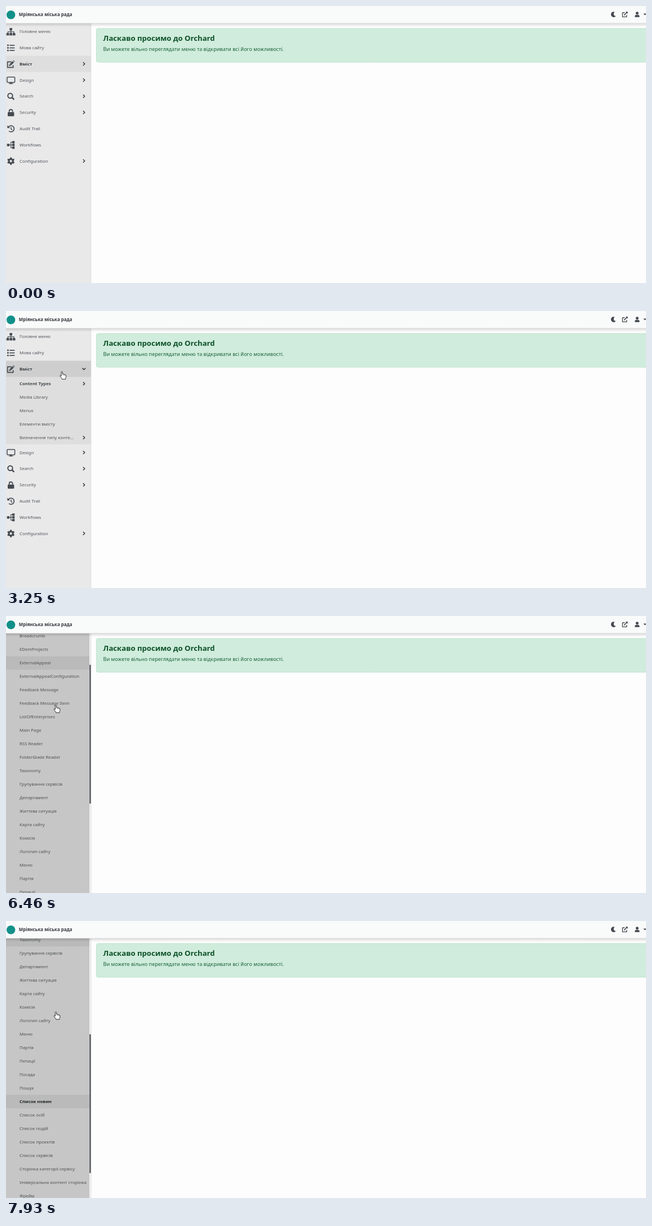
Write an HTML page with a canvas that moves like this. It is 1136x493 px and loops after 8000 ms.

```html
<!DOCTYPE html>
<html lang="uk">
<head>
<meta charset="utf-8">
<title>Адмін-панель</title>
<style>
html, body { margin: 0; width: 100%; height: 100%; overflow: hidden; background: #fdfdfd; }
canvas { display: block; width: 1136px; height: 493px; }
</style>
</head>
<body>
<canvas id="stage" width="1136" height="493"></canvas>
<script>
const ctx = document.getElementById('stage').getContext('2d');
const W = 1136, H = 493, LOOP = 8000;
const TOP = 31, VIEW = 521, SIDE = 151, ROW = 28.8, SUB = 24;
const FONT = '"Noto Sans", "Open Sans", sans-serif';
const INK = '#444a50', LABEL = '#505458';

const TYPES = ['Breadcrumb', 'EDemProjects', 'ExternalAppeal', 'ExternalAppealConfiguration',
  'Feedback Message', 'Feedback Message Item', 'ListOfEnterprises', 'Main Page', 'RSS Reader',
  'FolderGlade Reader', 'Taxonomy', 'Групування сервісів', 'Департамент', 'Життєва ситуація',
  'Карта сайту', 'Комісія', 'Логотип сайту', 'Меню', 'Партія', 'Петиції', 'Посада', 'Пошук',
  'Список новин', 'Список осіб', 'Список подій', 'Список проектів', 'Список сервісів',
  'Сторінка категорії сервісу', 'Універсальна контент сторінка', 'Фрейм'];
const SUBMENU = ['Media Library', 'Menus', 'Елементи вмісту', 'Визначення типу конте...'];

// Motion: each key is [time, value...]; values ease between neighbouring keys.
const CURSOR = [[610, 1087, 486], [1410, 113, 95], [1710, 100.7, 103], [3040, 100.7, 103],
  [3790, 93, 128.7], [5420, 93, 128.7], [5680, 91.3, 152], [5740, 90.5, 153], [5980, 88.7, 157],
  [6120, 88.7, 157], [6400, 88.5, 158.6], [6600, 88.5, 159], [6910, 88.5, 161.7]];
const SCROLL = [[6150, 0], [6300, 60], [6330, 60], [6478, 120], [6700, 120], [6900, 180],
  [6930, 180], [7180, 240], [7450, 240], [7644, 300], [7720, 300], [7930, 360]];
const HOVER = [[1350, 'Вміст'], [3430, 'Content Types'], [5560, 'Breadcrumb'],
  [6220, 'ExternalAppeal'], [6580, 'Feedback Message Item'], [6900, 'RSS Reader'], [7180, 'Taxonomy']];
const CLICKS = [[2200, 2350], [4890, 5020]];
const OPEN_TIME = 350;

const clamp = x => Math.max(0, Math.min(1, x));
const smooth = x => x * x * (3 - 2 * x);

function sample(keys, t) {
  if (t <= keys[0][0]) return keys[0].slice(1);
  for (let i = 1; i < keys.length; i++) {
    const a = keys[i - 1], b = keys[i];
    if (t < b[0]) {
      const p = smooth((t - a[0]) / (b[0] - a[0]));
      return a.slice(1).map((v, k) => v + (b[k + 1] - v) * p);
    }
  }
  return keys[keys.length - 1].slice(1);
}

// The CSS "ease" curve.
function ease(x) {
  const bez = (u, a, b) => 3 * u * (1 - u) ** 2 * a + 3 * u * u * (1 - u) * b + u ** 3;
  let lo = 0, hi = 1;
  for (let i = 0; i < 16; i++) {
    const mid = (lo + hi) / 2;
    if (bez(mid, .25, .25) < x) lo = mid; else hi = mid;
  }
  return x <= 0 ? 0 : x >= 1 ? 1 : bez(lo, .1, 1);
}
const opened = (t, start) => ease(clamp((t - start) / OPEN_TIME));

function box(x, y, w, h, color) {
  ctx.fillStyle = color;
  ctx.fillRect(x, y, w, h);
}
function text(str, x, y, size, color, weight = 400) {
  ctx.font = `${weight} ${size}px ${FONT}`;
  ctx.fillStyle = color;
  ctx.fillText(str, x, y);
}
function line(width, ...pts) {
  ctx.lineWidth = width;
  ctx.beginPath();
  for (let i = 0; i < pts.length; i += 2) ctx.lineTo(pts[i], pts[i + 1]);
  ctx.stroke();
}
function arc(x, y, r, from = 0, to = 7, width = 0) {
  ctx.beginPath();
  ctx.arc(x, y, r, from, Math.min(to, from + 2 * Math.PI));
  if (width) { ctx.lineWidth = width; ctx.stroke(); } else ctx.fill();
}
function round(x, y, w, h, r) {
  ctx.beginPath();
  ctx.roundRect(x, y, w, h, r);
}
function at(x, y, draw) {
  ctx.save();
  ctx.translate(x, y);
  ctx.fillStyle = ctx.strokeStyle = INK;
  ctx.lineJoin = 'round';
  draw();
  ctx.restore();
}
function clipped(x, y, w, h, draw) {
  ctx.save();
  ctx.beginPath();
  ctx.rect(x, y, w, h);
  ctx.clip();
  draw();
  ctx.restore();
}

const icons = {
  sitemap() {
    ctx.fillRect(-2.3, -6.5, 4.6, 4.3);
    for (const x of [-7.8, -2.3, 3.2]) ctx.fillRect(x, 2.4, 4.6, 4.3);
    line(1.2, 0, -3, 0, 3);
    line(1.2, -5.5, 3, -5.5, .2, 5.5, .2, 5.5, 3);
  },
  list() {
    for (const y of [-4.6, 0, 4.6]) {
      ctx.fillRect(-6.6, y - 1.3, 2.7, 2.6);
      ctx.fillRect(-2.4, y - .8, 9, 1.7);
    }
  },
  edit() {
    line(1.7, 1, -4, -6, -4, -6, 6, 4, 6, 4, 2);
    line(3.4, -1, 1.2, 4.1, -3.9);
    line(3.4, 4.9, -4.7, 5.7, -5.5);
    ctx.beginPath();
    ctx.moveTo(-3.4, 3.6); ctx.lineTo(-2.8, .2); ctx.lineTo(0, 3); ctx.fill();
  },
  desktop() {
    round(-6.7, -5.6, 13.6, 9.4, 1);
    ctx.lineWidth = 1.5; ctx.stroke();
    ctx.fillRect(-1.6, 4, 3.4, 2);
    ctx.fillRect(-3.6, 5.5, 7.4, 1.2);
  },
  search() {
    arc(-1.2, -1.2, 4.2, 0, 7, 2);
    line(2.6, 2, 2, 5.6, 5.6);
  },
  lock() {
    round(-5.7, -.8, 11.4, 7.4, 1.3); ctx.fill();
    arc(0, -2.4, 3, Math.PI, 2 * Math.PI, 1.9);
    line(1.9, -3, -2.4, -3, 0); line(1.9, 3, -2.4, 3, 0);
  },
  history() {
    arc(.2, 0, 5.5, -2.5, 2.3, 1.7);
    ctx.beginPath();
    ctx.moveTo(-6.4, -6); ctx.lineTo(-6.4, -1.2); ctx.lineTo(-1.6, -1.2); ctx.fill();
    line(1.5, .3, -3, .3, .5, 2.4, 2.1);
  },
  flow() {
    ctx.fillRect(-7, -2.1, 4.4, 4.4);
    for (const y of [-7, -2.1, 2.8]) ctx.fillRect(2.4, y, 4.2, 4.2);
    line(1.2, -3, 0, 3, 0);
    line(1.2, 3, -5, 0, -5, 0, 5, 3, 5);
  },
  cog() {
    arc(0, 0, 3.6, 0, 7, 3);
    for (let i = 0; i < 6; i++) {
      const a = Math.PI / 6 + i * Math.PI / 3, c = Math.cos(a), s = Math.sin(a);
      line(3, 4 * c, 4 * s, 6.6 * c, 6.6 * s);
    }
  },
};

const MENU = [['Головне меню', 'sitemap'], ['Мова сайту', 'list'], ['Вміст', 'edit', 1],
  ['Design', 'desktop', 1], ['Search', 'search', 1], ['Security', 'lock', 1],
  ['Audit Trail', 'history'], ['Workflows', 'flow'], ['Configuration', 'cog', 1]];

function chevron(y, down) {
  at(138.3, y, () => {
    if (down) ctx.rotate(Math.PI / 2);
    ctx.strokeStyle = '#33383c';
    line(1.4, -1.5, -2.9, 1.5, 0, -1.5, 2.9);
  });
}
function label(str, middle, strong, color = LABEL) {
  text(str, 24, middle + 2.7, 7.8, color, strong ? 600 : 400);
}

function drawTypes(y, width, hover) {
  box(0, y, width, TYPES.length * SUB, '#c6c6c6');
  TYPES.forEach((name, i) => {
    const top = y + i * SUB, active = name === 'Список новин';
    if (active || name === hover) box(0, top, width, SUB, '#bababa');
    label(name, top + SUB / 2, active, active ? '#1f2326' : '#4d5053');
  });
}

function drawSubmenu(y, width, hover, typesHeight, typesOpen) {
  if (hover === 'Content Types') box(0, y, width, SUB, '#cecece');
  label('Content Types', y + SUB / 2, true, '#42474b');
  chevron(y + SUB / 2, typesOpen);
  y += SUB;
  if (typesHeight > 0) clipped(0, y, width, typesHeight, () => drawTypes(y, width, hover));
  const rest = y + typesHeight;
  SUBMENU.forEach((name, i) => {
    const mid = rest + (i + .5) * SUB;
    label(name, mid);
    if (i === 3) chevron(mid, false);
  });
}

function drawSidebar(t, hover) {
  const typesHeight = TYPES.length * SUB * opened(t, 5020);
  const subHeight = (5 * SUB + typesHeight) * opened(t, 2350);
  const total = MENU.length * ROW + subHeight;
  const overflow = total > VIEW;
  const width = overflow ? 148 : SIDE;
  const scroll = sample(SCROLL, t)[0];

  box(0, TOP, SIDE, H - TOP, '#e9e9ea');
  clipped(0, TOP, width, H - TOP, () => {
    let y = TOP - scroll;
    for (const [name, icon, hasChildren] of MENU) {
      const mid = y + ROW / 2, content = name === 'Вміст';
      if (content) box(0, y, width, ROW + subHeight, '#dedede');
      if (name === hover) box(0, y, width, ROW, '#cecece');
      at(8.7, mid + .3, icons[icon]);
      label(name, mid, content, content ? '#393e42' : LABEL);
      if (hasChildren) chevron(mid, content && t >= 2350);
      y += ROW;
      if (content && subHeight > 0) {
        const top = y;
        clipped(0, top, width, subHeight, () => drawSubmenu(top, width, hover, typesHeight, t >= 5020));
        y += subHeight;
      }
    }
  });
  if (overflow) {
    box(148, TOP, 3, H - TOP, '#f0f0f1');
    box(148.3, TOP + scroll * VIEW / total, 2.5, VIEW * VIEW / total, '#45494e');
  }
  box(SIDE - .4, TOP, .8, H - TOP, '#dedede');
}

function drawMain() {
  box(0, 0, W, H, '#fdfdfd');
  round(160.4, 39.9, 1000, 60.2, 3);
  ctx.fillStyle = '#d0ecdc'; ctx.fill();
  ctx.strokeStyle = '#afdfc5'; ctx.lineWidth = .7; ctx.stroke();
  text('Ласкаво просимо до Orchard', 172.6, 61.6, 13.15, '#0c5128', 600);
  text('Ви можете вільно переглядати меню та відкривати всі його можливості.', 172.6, 79.8, 9.03, '#17613a');
}

function drawHeader() {
  const shade = ctx.createLinearGradient(0, TOP - 1, 0, TOP + 6);
  shade.addColorStop(0, 'rgba(0,0,0,.16)');
  shade.addColorStop(1, 'rgba(0,0,0,0)');
  box(0, TOP - 1, W, 7, shade);
  box(0, 0, W, TOP - .6, '#f9fafa');
  ctx.fillStyle = '#12908a';
  arc(8.7, 15.7, 7.7);
  text('Мріянська міська рада', 22.8, 18, 7.9, '#363b3f', 700);

  at(1078.6, 15, () => {
    ctx.beginPath();
    ctx.arc(0, 0, 4.8, -1.2, .6, true);
    ctx.quadraticCurveTo(.2, 3, .1, -1);
    ctx.quadraticCurveTo(.2, -3.4, 1.7, -4.5);
    ctx.fill();
  });
  at(1098.5, 15, () => {
    line(1.3, -.2, -3, -4.2, -3, -4.2, 4.4, 3.2, 4.4, 3.2, 1);
    line(1.5, -1.4, 1.4, 4, -4);
    ctx.beginPath();
    ctx.moveTo(1.2, -4.9); ctx.lineTo(5, -4.9); ctx.lineTo(5, -1.1); ctx.fill();
  });
  at(1120.3, 15, () => {
    arc(0, -2.3, 2.5);
    round(-4.2, .8, 8.4, 4, [3, 3, .8, .8]); ctx.fill();
  });
  at(1134, 15, () => {
    ctx.beginPath();
    ctx.moveTo(-2.8, -1.4); ctx.lineTo(2.8, -1.4); ctx.lineTo(0, 1.5); ctx.fill();
  });
}

const HAND = new Path2D('M-1.1 1Q-1.1-.1 0-.1Q1.1-.1 1.1 1V4.6Q1.4 4 2.3 4.1Q3.2 4.3 3.2 5' +
  'Q4 4.4 4.8 4.8Q5.4 5 5.4 5.7Q6.4 5.3 7 6Q7.3 6.4 7.3 7V9.5Q7.3 11 6.4 12V13.4H.2V12.4' +
  'Q-1.6 10.6-3.4 7.8Q-3.6 6.8-2.6 6.6Q-1.8 6.6-1.1 7.8Z');
const ARROW = new Path2D('M0 0V10L2.3 7.9L3.8 11.3L5.3 10.6L3.9 7.4H7Z');

function drawCursor(t) {
  if (t < CURSOR[0][0]) return;
  const [x, y] = sample(CURSOR, t);
  const hand = x < SIDE;
  at(x, y, () => {
    if (CLICKS.some(([from, to]) => t >= from && t < to)) {
      ctx.fillStyle = 'rgba(233,226,70,.88)';
      arc(0, 0, 7.6);
    }
    const shape = hand ? HAND : ARROW;
    ctx.fillStyle = '#fff';
    ctx.fill(shape);
    ctx.strokeStyle = '#1c1c1c';
    ctx.lineWidth = .9;
    ctx.stroke(shape);
    if (hand) for (const fx of [3.2, 5.4]) line(.6, fx, 5.2, fx, 7);
  });
}

function frame(now) {
  const t = now % LOOP;
  const hover = HOVER.reduce((name, [from, next]) => t >= from ? next : name, '');
  drawMain();
  drawSidebar(t, hover);
  drawHeader();
  drawCursor(t);
  requestAnimationFrame(frame);
}
frame(0);
</script>
</body>
</html>
```
